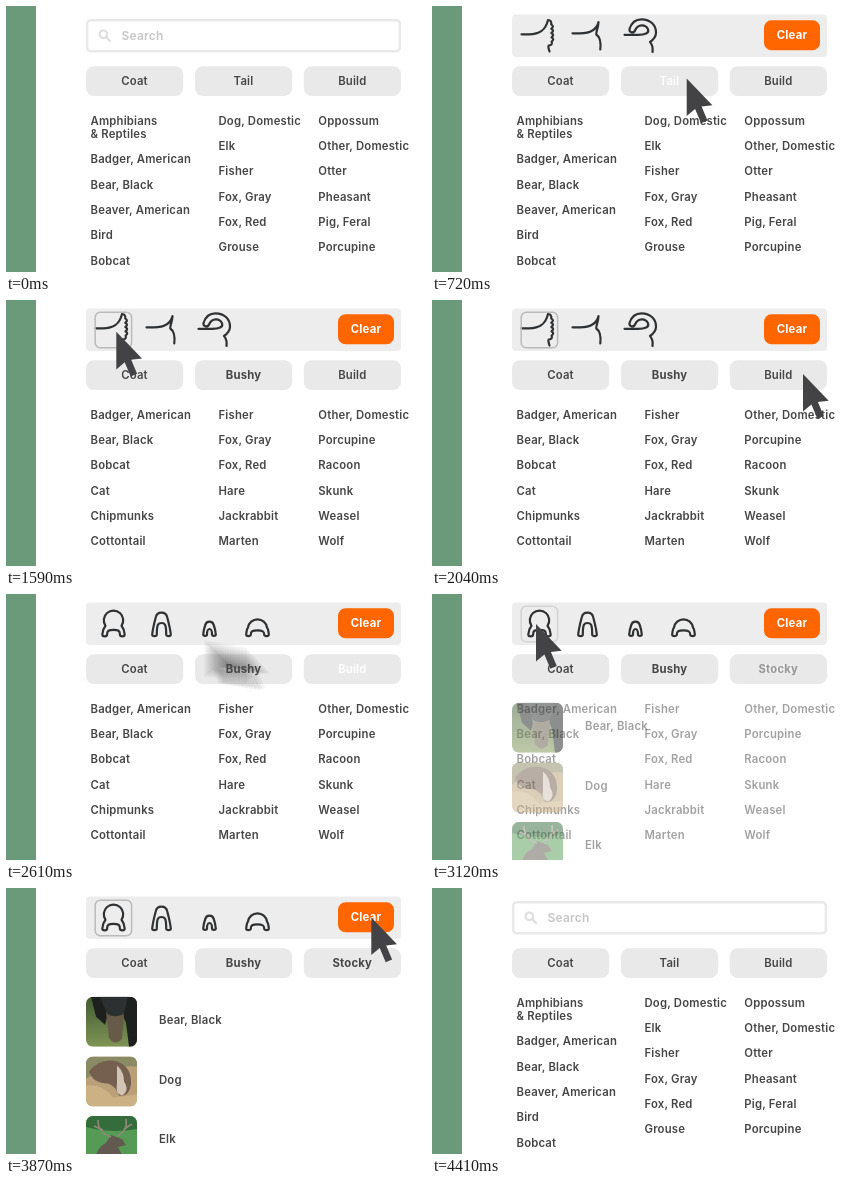
Animation, 420 px wide and 266 px high, one loop 6.3 s. Source, as an HTML page with a canvas:

```html
<!DOCTYPE html>
<html lang="en">
<head>
<meta charset="utf-8">
<title>Animal search</title>
<style>
  html, body { margin: 0; width: 100%; height: 100%; overflow: hidden; background: #fff; }
  svg, canvas { position: absolute; left: 0; top: 0; width: 420px; height: 266px; }
  text { font: 600 11.3px Inter, "Open Sans", sans-serif; letter-spacing: .2px; fill: #464648; }
  .mid { text-anchor: middle; }
  .bold { font-weight: 700; }
  .white { fill: #fff; }
  .icon { fill: none; stroke: #2f3133; stroke-width: 2.2; stroke-linecap: round; stroke-linejoin: round; }
  .pick { fill: none; stroke: #bababa; stroke-width: 1.5; }
</style>
</head>
<body>
<svg id="stage" viewBox="0 0 420 266"></svg>
<canvas id="pointer"></canvas>
<script>
const LOOP = 6300, FRAME = 30;
// Click times
const TAIL = 690, BUSHY = 1560, BUILD = 2430, STOCKY = 3120, CLEAR = 4320;

const text = (x, y, s, cls = '') => `<text x="${x}" y="${y}" class="${cls}">${s}</text>`;
const box = (x, y, w, h, r, attrs) =>
  `<rect x="${x}" y="${y}" width="${w}" height="${h}" rx="${r}" ${attrs}/>`;
// A group shown between two times; "outside" shows it before and after instead
const layer = (from, to, body, outside = false) =>
  `<g data-from="${from}" data-to="${to}" data-outside="${outside ? 1 : ''}">${body}</g>`;

const column = (x, y, names) =>
  names.split('|').map((s, i) => text(x, y + i * 25.3, s)).join('');
const label = (x, s, cls = '') => text(x, 78.8, s, 'mid ' + cls);

const allAnimals =
  text(84.5, 118.8, 'Amphibians') + text(84.5, 132, '&amp; Reptiles') +
  column(84.5, 157.4, 'Badger, American|Bear, Black|Beaver, American|Bird|Bobcat') +
  column(212.5, 118.8, 'Dog, Domestic|Elk|Fisher|Fox, Gray|Fox, Red|Grouse') +
  column(312.3, 118.8, 'Oppossum|Other, Domestic|Otter|Pheasant|Pig, Feral|Porcupine');
const bushyAnimals =
  column(84.5, 118.8, 'Badger, American|Bear, Black|Bobcat|Cat|Chipmunks|Cottontail') +
  column(212.5, 118.8, 'Fisher|Fox, Gray|Fox, Red|Hare|Jackrabbit|Marten') +
  column(312.3, 118.8, 'Other, Domestic|Porcupine|Racoon|Skunk|Weasel|Wolf');

const search =
  box(81.2, 14.2, 312.6, 31, 3.5, 'fill="#fff" stroke="#e9e9e9" stroke-width="2.5"') +
  `<g fill="none" stroke="#dedede" stroke-width="2.2" stroke-linecap="round">
     <circle cx="97.3" cy="28.3" r="3.8"/><path d="M100.3 31.3L104 35"/></g>
   <text x="115.5" y="34.4" style="font-size:12px;fill:#c6c6c6">Search</text>`;

const panel =
  box(80, 8.5, 315, 42.5, 4, 'fill="#ededed"') +
  box(332, 14.2, 56, 30, 7.5, 'fill="#ff6600"') +
  text(360, 33.2, 'Clear', 'mid bold white');

const tails = `<g class="icon">
  <path d="M89.5 28.3H97C107 28.3 113.5 25 116 14q4 .5 3.2 4.4
    ${'q3.4 2 .1 4.3'.repeat(4)}q1.5 3.6 -3 4Q116 41 117.5 45.5"/>
  <path d="M140.5 27.3H148C157 27.3 164.5 25 166.5 16C166.3 22 164 25 164.3 28.5C168 31 169 37 168.3 43.5"/>
  <path d="M192.5 28.8H206C213 28.8 217.5 27 216 23.3C213.5 18 206 18 203.3 24C202 27.5 197 27 197.5 23
    C199.5 16.5 204 13.3 209.5 13.3C218.5 13.3 224.3 19.5 224 27C223.8 31.5 221 34 218 36C220.3 38.5 221 42 220.5 46"/></g>`;

// Front view of an animal: rounded back, two spread legs
function build(x, a, j, y, r, large, arch, foot) {
  const i = a - foot, f = foot / 2;
  return `<path transform="translate(${x} 0)" d="M${-a} 40.5Q${.5 - a} 35 ${-j} ${y}
    A${r} ${r} 0 ${large} 1 ${j} ${y}Q${a - .5} 35 ${a} 40.5A${f} ${f - .6} 0 0 1 ${i} 40.5
    C${i} ${arch + 1} ${i - 1.5} ${arch} 0 ${arch}S${-i} ${arch + 1} ${-i} 40.5
    A${f} ${f - .6} 0 0 1 ${-a} 40.5Z"/>`;
}
const builds = `<g class="icon">${
  build(107.5, 11.2, 8, 31.8, 9.7, 1, 35.8, 4.8) +
  build(155.5, 9.3, 5.8, 23.5, 5.9, 0, 29, 4.6) +
  build(203.5, 6.3, 4.2, 31, 4.3, 0, 35, 3.8) +
  build(251.5, 11.3, 9.5, 33.5, 9.6, 0, 36.3, 4.6)}</g>`;

const pick = box(89.2, 12.2, 36.4, 35.6, 5, 'class="pick"');

// Simple flat pictures for the result list
const picture = (y, back, shapes) =>
  `<g transform="translate(80 ${y})" clip-path="url(#round)">
     <rect width="51" height="50" fill="${back}"/>${shapes}</g>`;
const results =
  picture(108.8, 'url(#grass)', `
    <path d="M5 0H51V50H43L40 26L36 17H22L19 28L10 20Z" fill="#1d201f"/>
    <path d="M20 15Q29 9 38 15L36 42Q29 50 23 41Z" fill="#665b48"/>
    <path d="M14 0H42L38 17Q29 22 21 17Z" fill="#2c3030"/>`) +
  picture(168.5, '#b9a078', `
    <path d="M0 0H51V10Q22 8 0 22Z" fill="#8a8a64"/>
    <path d="M3 15Q14 1 31 5Q46 10 45 28Q43 41 33 39Q29 29 22 27Q7 27 3 15Z" fill="#75604f"/>
    <path d="M31 9Q38 15 38 25Q44 34 36 39Q29 38 31 27Z" fill="#d2c4b5"/>
    <path d="M0 29Q17 27 27 41L51 38V50H0Z" fill="#cbb184"/>`) +
  picture(228, '#569b55', `
    <path d="M0 0H51V13Q25 18 0 11Z" fill="#356c3b"/>
    <path d="M8 50Q9 32 20 27L25 19L36 23L40 29L32 31L42 50Z" fill="#625a50"/>
    <path d="M25 21Q12 17 12 4M17 14L8 10M31 20Q42 15 40 3M38 13L46 8"
      fill="none" stroke="#8f8a78" stroke-width="1.6"/>`) +
  text(153, 136, 'Bear, Black') + text(153, 195.5, 'Dog') + text(153, 255, 'Elk');

stage.innerHTML = `
  <defs><clipPath id="round"><rect width="51" height="50" rx="7"/></clipPath>
  <linearGradient id="grass" x2="0" y2="1"><stop stop-color="#405b32"/><stop offset="1" stop-color="#7f9455"/></linearGradient></defs>
  <rect width="30" height="266" fill="#6b9a7a"/>` +
  layer(TAIL, CLEAR, search, true) +
  layer(TAIL, CLEAR, panel) +
  layer(TAIL, BUILD, tails) +
  layer(BUILD, CLEAR, builds) +
  layer(BUSHY, BUILD, pick) +
  layer(STOCKY, CLEAR, pick) +
  [80, 189, 297.8].map(x => box(x, 60.2, 97.2, 29.8, 8, 'fill="#e9e9e9"')).join('') +
  label(128.5, 'Coat') +
  layer(TAIL, CLEAR, label(237.5, 'Tail'), true) +
  layer(TAIL, BUSHY, label(237.5, 'Tail', 'white')) +
  layer(BUSHY, CLEAR, label(237.5, 'Bushy', 'bold')) +
  layer(BUILD, CLEAR, label(346.3, 'Build'), true) +
  layer(BUILD, STOCKY, label(346.3, 'Build', 'white')) +
  layer(STOCKY, CLEAR, label(346.3, 'Stocky', 'bold')) +
  layer(BUSHY, CLEAR, allAnimals, true) +
  layer(BUSHY, STOCKY, bushyAnimals) +
  layer(STOCKY, CLEAR, results);

const layers = [...stage.querySelectorAll('[data-from]')].map(el => ({
  el, from: +el.dataset.from, to: +el.dataset.to, outside: !!el.dataset.outside
}));

// Pointer moves: start, end, target x, target y
const START = [440, 203];
const MOVES = [
  [390, 640, 254.7, 72.5],
  [1022, 1290, 110.3, 31.8],
  [1770, 2040, 371, 74],
  [2546, 2760, 104, 30],
  [3477, 3870, 365.3, 29.5],
  [4290, 4410, 445, 72]
];

const clamp = v => Math.max(0, Math.min(1, v));

// cubic-bezier(.33, 0, .05, 1)
function ease(p) {
  let lo = 0, hi = 1, u = .5;
  for (let i = 0; i < 20; i++) {
    u = (lo + hi) / 2;
    const x = 3 * u * (1 - u) * ((1 - u) * .33 + u * .05) + u ** 3;
    if (x < p) lo = u; else hi = u;
  }
  return u * u * (3 - 2 * u);
}

function pointerAt(t) {
  let [x, y] = START;
  for (const [from, to, tx, ty] of MOVES) {
    if (t <= from) break;
    const k = t >= to ? 1 : ease((t - from) / (to - from));
    x += (tx - x) * k;
    y += (ty - y) * k;
  }
  return [x, y];
}

const arrow = new Path2D('M0 0V37.6L8.4 30.4L14.4 44.7L20.8 42L14.9 28L25.7 26.8Z');
const ratio = window.devicePixelRatio || 1;
pointer.width = 420 * ratio;
pointer.height = 266 * ratio;
const ctx = pointer.getContext('2d');

// Average the arrow over a short shutter time
function drawPointer(t) {
  ctx.setTransform(ratio, 0, 0, ratio, 0, 0);
  ctx.clearRect(0, 0, 420, 266);
  const moving = MOVES.some(([from, to]) => t > from && t < to);
  const n = moving ? 17 : 1;
  ctx.globalCompositeOperation = 'lighter';
  ctx.globalAlpha = 1 / n;
  ctx.fillStyle = '#434345';
  for (let i = 0; i < n; i++) {
    const [x, y] = pointerAt(t + (n > 1 ? (i / (n - 1) - .5) * 14 : 0));
    ctx.setTransform(ratio, 0, 0, ratio, x * ratio, y * ratio);
    ctx.fill(arrow);
  }
}

function render(t) {
  const done = at => clamp((t - at + FRAME) / (2 * FRAME));
  for (const { el, from, to, outside } of layers) {
    const on = done(from) - done(to);
    el.style.opacity = outside ? 1 - on : on;
  }
  drawPointer(t);
}

const begin = performance.now();
function tick() {
  const t = (performance.now() - begin) % LOOP;
  render(Math.floor(t / FRAME + .01) * FRAME);
  requestAnimationFrame(tick);
}
tick();
</script>
</body>
</html>
```
